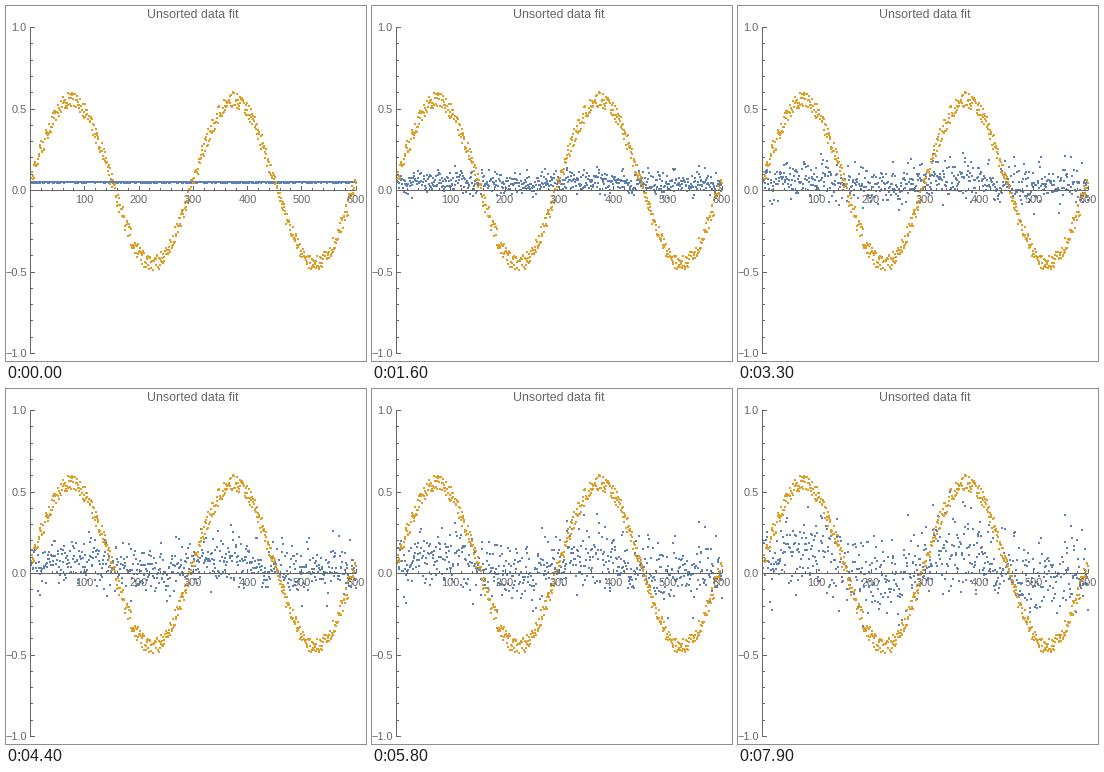
Animation of 360 by 355 pixels, one loop 8 s. Source, as a matplotlib script:

```python
import numpy as np
import matplotlib.pyplot as plt
from matplotlib.animation import FuncAnimation
from matplotlib.collections import LineCollection, PolyCollection

W, H, DPI = 360, 355, 100
FRAMES, STEP = 80, 100
X0, Y0 = 24.5, 184.5          # pixel position of the axes' crossing
SX, SY = 0.5425, 163          # pixels per unit
BLUE, ORANGE, GRAY = "#5E81B5", "#E19C24", "#666666"

rng = np.random.default_rng(7)
n = 600
x = np.arange(1, n + 1)
wave = np.sin(2 * np.pi * x / 300)
data = 0.054 + 0.5 * wave + rng.uniform(-0.05, 0.05, n)
spread_a, spread_b, start = rng.normal(size=(3, n)).clip(-3.1, 3.1)


def fit(frame):
    """Predictions spread out around a constant and slowly pick up the wave."""
    t = frame / (FRAMES - 1)
    turn = 0.9 * t
    noise = spread_a * np.cos(turn) + spread_b * np.sin(turn)
    jitter = np.random.default_rng(100 + frame).normal(size=n)
    return (0.0495 + 0.0006 * start + 0.075 * t**2 * wave
            + 0.123 * t**0.77 * noise + 0.007 * min(1, 9 * t) * jitter)


def dots(y):
    """Two-pixel squares aligned to the pixel grid."""
    left = np.round(X0 + SX * x - 1)
    top = np.round(Y0 - SY * y - 1)
    corners = np.array([(0, 0), (2, 0), (2, 2), (0, 2)])
    return np.stack([left, top], axis=1)[:, None, :] + corners


fig = plt.figure(figsize=(W / DPI, H / DPI), dpi=DPI, facecolor="white")
ax = fig.add_axes([0, 0, 1, 1])
ax.set(xlim=(0, W), ylim=(H, 0))
ax.axis("off")

blue = PolyCollection(dots(fit(0)), facecolors=BLUE, linewidths=0, zorder=1)
ax.add_collection(blue, autolim=False)
ax.add_collection(PolyCollection(dots(data), facecolors=ORANGE, linewidths=0,
                                 zorder=2), autolim=False)


def label(px, baseline, text, size=11, ha="center"):
    ax.text(px, baseline, text, fontsize=size * 72 / DPI, ha=ha, va="baseline",
            color=GRAY, family="Liberation Sans", zorder=4)


lines = [[(24, Y0), (350, Y0)], [(X0, 21), (X0, 348)]]
for v in range(20, n + 1, 20):
    px = np.floor(X0 + SX * v) + 0.5
    major = v % 100 == 0
    lines.append([(px, Y0), (px, Y0 - (4.5 if major else 2.5))])
    if major:
        label(X0 + SX * v, 197, str(v))
for k in range(-10, 11):
    py = np.floor(Y0 - SY * k / 10) + 0.5
    major = k % 5 == 0
    lines.append([(X0, py), (X0 + (4.5 if major else 2.5), py)])
    if major:
        label(20.8, py + 3.5, f"{k / 10:.1f}".replace("-", "\u2212"), ha="right")
# The lines already sit on pixel centres, so snapping would shift them.
ax.add_collection(LineCollection(lines, colors=GRAY, linewidths=72 / DPI,
                                 capstyle="butt", snap=False, zorder=3),
                  autolim=False)
label(186.5, 12, "Unsorted data fit", 12.4)


def update(frame):
    blue.set_verts(dots(fit(frame)))
    return [blue]


anim = FuncAnimation(fig, update, frames=FRAMES, interval=STEP, repeat=True,
                     repeat_delay=0, blit=False)
plt.show()
```
